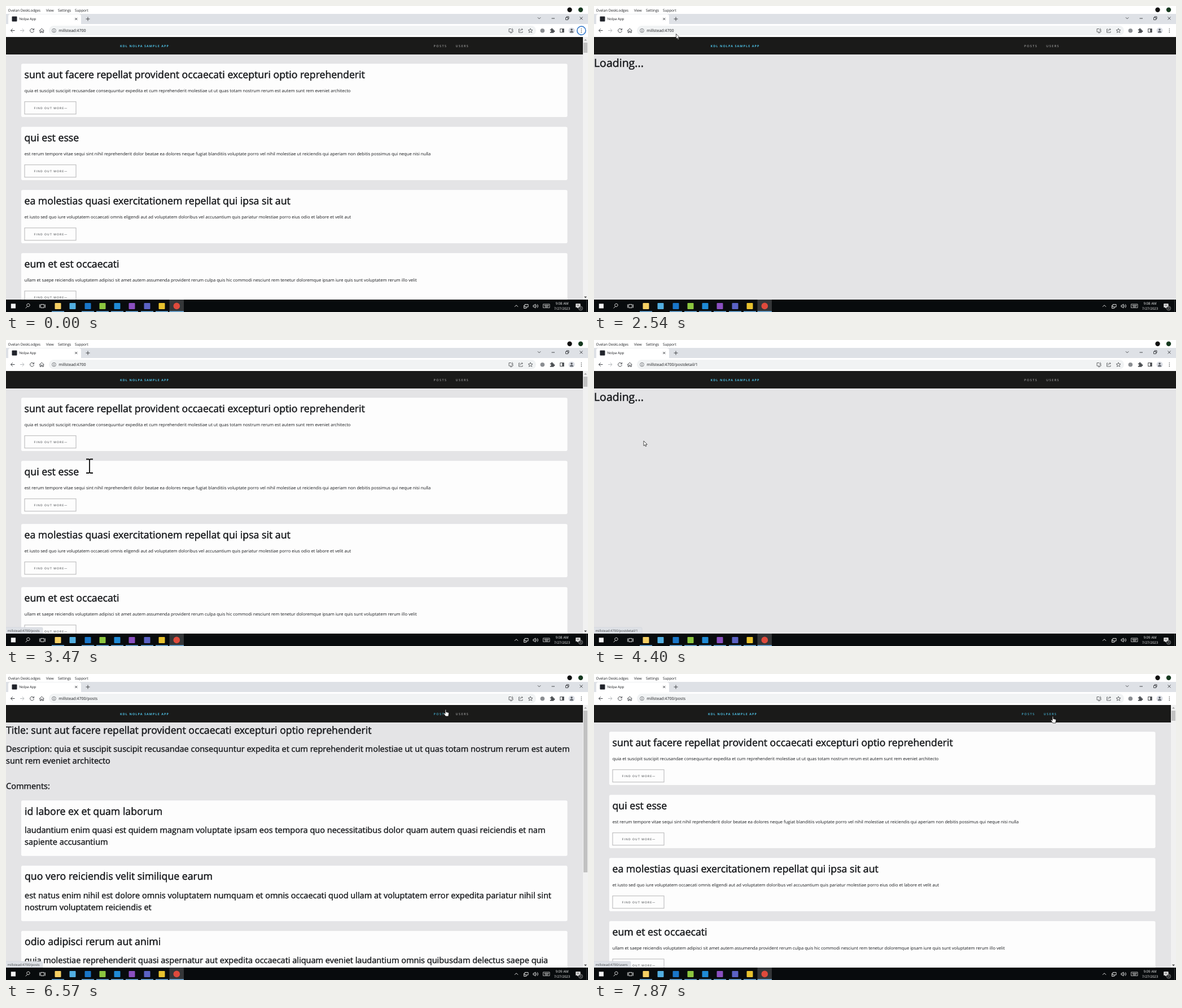
An HTML page that plays this animation: 1031x543 px, repeating every 8000 ms.

```html
<!DOCTYPE html>
<html lang="en">
<head>
<meta charset="utf-8">
<title>Sample app</title>
<style>
  html, body { margin: 0; width: 100%; height: 100%; overflow: hidden; background: #e4e4e6; }
  svg { display: block; }
  text { font-family: "Open Sans", "Noto Sans", sans-serif; text-rendering: geometricPrecision; white-space: pre; fill: #17191c; }
  .head { stroke: #17191c; stroke-width: .5px; }
  .mid { stroke: #17191c; stroke-width: .42px; }
  .nav { letter-spacing: 1.4px; font-weight: 600; fill: #999; }
  .brand { letter-spacing: 1.1px; font-weight: 700; fill: #4fc3e8; }
  .btn { letter-spacing: 1.1px; font-weight: 600; fill: #5c5f62; }
  .line { fill: none; stroke: #44474b; stroke-width: 1; }
  .tray { fill: none; stroke: #f2f2f2; stroke-width: .9; }
  .light { fill: #f4f4f4; }
</style>
</head>
<body>
<svg id="stage" width="1031" height="543" viewBox="0 0 1031 543"></svg>
<script>
const LOOP = 8000;
const HOST = 'millstead:4700';
const HEAD = 17.7, MID = 14.53, BODY = 7.61;

// Drawing helpers
const text = (x, y, size, str, more = '') => `<text x="${x}" y="${y}" font-size="${size}" ${more}>${str}</text>`;
const rect = (x, y, w, h, fill, more = '') => `<rect x="${x}" y="${y}" width="${w}" height="${h}" fill="${fill}" ${more}/>`;
const disc = (x, y, r, fill, more = '') => `<circle cx="${x}" cy="${y}" r="${r}" fill="${fill}" ${more}/>`;
const line = (d, more = '', cls = 'line') => `<path class="${cls}" d="${d}" ${more}/>`;
const card = (y, h) => rect(26.5, y, 968.5, h, '#fdfdfd', 'rx="3" stroke="#dcdcdf" stroke-width=".6"');
const head = (x, y, str) => text(x, y, HEAD, str, 'class="head"');
const mid = (x, y, str) => text(x, y, MID, str, 'class="mid"');

const posts = [
  ['sunt aut facere repellat provident occaecati excepturi optio reprehenderit',
   'quia et suscipit suscipit recusandae consequuntur expedita et cum reprehenderit molestiae ut ut quas totam nostrum rerum est autem sunt rem eveniet architecto'],
  ['qui est esse',
   'est rerum tempore vitae sequi sint nihil reprehenderit dolor beatae ea dolores neque fugiat blanditiis voluptate porro vel nihil molestiae ut reiciendis qui aperiam non debitis possimus qui neque nisi nulla'],
  ['ea molestias quasi exercitationem repellat qui ipsa sit aut',
   'et iusto sed quo iure voluptatem occaecati omnis eligendi aut ad voluptatem doloribus vel accusantium quis pariatur molestiae porro eius odio et labore et velit aut'],
  ['eum et est occaecati',
   'ullam et saepe reiciendis voluptatem adipisci sit amet autem assumenda provident rerum culpa quis hic commodi nesciunt rem tenetur doloremque ipsam iure quis sunt voluptatem rerum illo velit'],
];

const comments = [
  ['id labore ex et quam laborum',
   'laudantium enim quasi est quidem magnam voluptate ipsam eos tempora quo necessitatibus dolor quam autem quasi reiciendis et nam',
   'sapiente accusantium'],
  ['quo vero reiciendis velit similique earum',
   'est natus enim nihil est dolore omnis voluptatem numquam et omnis occaecati quod ullam at voluptatem error expedita pariatur nihil sint',
   'nostrum voluptatem reiciendis et'],
  ['odio adipisci rerum aut animi',
   'quia molestiae reprehenderit quasi aspernatur aut expedita occaecati aliquam eveniet laudantium omnis quibusdam delectus saepe quia', ''],
];

const scrollbar = thumb => rect(1022, 55, 9, 466, '#f1f1f1') + rect(1023, 65, 7, thumb, '#c1c1c1') +
  '<path d="M1024 61.5l2.5-3 2.5 3z" fill="#a3a3a3"/><path d="M1024 515.5l2.5 3 2.5-3z" fill="#505050"/>';

const postList = posts.map(([title, body], i) => {
  const y = 102 + i * 112;
  return card(y, 95.5) + head(32.5, y + 25.5, title) + text(32.8, y + 50.7, BODY, body) +
    rect(33, y + 67.8, 91, 22, 'none', 'stroke="#b4b4b6"') + text(49.5, y + 81, 5, 'FIND OUT MORE—', 'class="btn"');
}).join('') + scrollbar(18);

const loading = text(0, 107.5, 19.5, 'Loading...', 'class="head"');

const split = posts[0][1].indexOf(' sunt rem');
const detail = head(0, 106, 'Title: ' + posts[0][0]) +
  mid(0, 138, 'Description: ' + posts[0][1].slice(0, split)) +
  mid(0, 159, posts[0][1].slice(split + 1)) +
  mid(0, 203.5, 'Comments:') +
  comments.map(([title, first, second], i) => {
    const y = 224 + i * 115.7;
    return card(y, 99.3) + head(33, y + 25.5, title) + mid(33, y + 57.8, first) + mid(33, y + 79.2, second);
  }).join('') + scrollbar(287);

const navbar = '<g id="links">' + text(202, 73.2, 5.4, 'KDL NOLPA SAMPLE APP', 'class="brand"') +
  text(757.5, 73.2, 5.5, 'POSTS', 'class="nav" id="postsLink"') +
  text(796.5, 73.2, 5.5, 'USERS', 'class="nav" id="usersLink"') + '</g>';

const browser = rect(0, 0, 1031, 14, '#fff') +
  text(3.5, 9.8, 6.3, 'Ovelan DeskLodges') + text(71, 9.8, 6.3, 'View') + text(92, 9.8, 6.3, 'Settings') + text(122, 9.8, 6.3, 'Support') +
  disc(998.5, 6.8, 4.2, '#111') + disc(1018, 6.8, 4.2, '#173a20') +
  rect(0, 14, 1031, 20, '#dee1e6') + rect(4, 14.5, 129, 24, '#fff', 'rx="4"') + rect(0, 32, 1031, 23, '#fff') +
  rect(10.5, 18.5, 9, 9, '#20232a', 'rx="1"') + text(23.5, 25.3, 6.1, 'Nolpa App') +
  line('M122.3 21l4 4m0-4l-4 4M141.5 23h7m-3.5-3.5v7') +
  line('M942 20.3l2.5 2.5 2.5-2.5M966.5 22h5.5M991.5 20.5h4v4h-4zM993 20.3v-1.5h4v4h-1.3M1016.5 19.3l5 5m0-5l-5 5') +
  rect(76, 35, 863, 17, '#f1f3f4', 'rx="8.5"') +
  line('M15.5 43.5h-7m3.2-3.2l-3.3 3.2 3.3 3.2') +
  line('M25 43.5h7m-3.2-3.2l3.3 3.2-3.3 3.2', 'style="stroke:#b5b8bb"') +
  line('M48.7 41.5a3.4 3.4 0 1 0 .7 2.6M49.5 39.8v2.5h-2.6') +
  line('M59.2 43.8l4.1-3.8 4.1 3.8M60.3 43v4.2h2v-2.5h2v2.5h2v-4.2') +
  disc(85, 43.6, 3.4, 'none', 'stroke="#5f6368" stroke-width=".8"') + line('M85 43.2v2.2m0-3.8v.8') +
  line('M895 40.5h-4v5.5h7v-2M893 47.6h3.5M897 39.5v4m-1.7-1.5l1.7 1.7 1.7-1.7', 'style="stroke-width:.8"') +
  line('M910.5 41h-2v6h6.5v-2M910.5 45c0-2.5 1.5-3.5 4.5-3.5m-1.6-1.8l1.8 1.8-1.8 1.8', 'style="stroke-width:.8"') +
  line('M929 39.8l1.1 2.6 2.8.2-2.1 1.8.7 2.8-2.5-1.5-2.5 1.5.7-2.8-2.1-1.8 2.8-.2z', 'style="stroke-width:.8"') +
  disc(950.3, 43.7, 3.8, '#8b8e92') +
  '<path d="M963.8 41.5h2a1.4 1.4 0 1 1 2.6 0h2v2a1.4 1.4 0 1 1 0 2.6v1.6h-6.6v-2a1.3 1.3 0 1 0 0-2.4z" fill="#4c4f53"/>' +
  rect(981.7, 40.6, 6.4, 6, 'none', 'stroke="#44474b"') + rect(985.3, 40.6, 2.8, 6, '#44474b') +
  disc(1002, 43.7, 5.5, '#d9dce3') + disc(1002, 42, 1.7, '#50545b') + '<path d="M998.8 47c.5-3.2 5.9-3.2 6.4 0z" fill="#50545b"/>' +
  disc(1019.3, 43.7, 7.6, 'none', 'id="ring" stroke="#2c74c9" stroke-width="1.5"') +
  [40.8, 43.7, 46.6].map(y => disc(1019.3, y, .8, '#44474b')).join('') +
  text(93.3, 46.2, 7.1, '', 'id="url"');

const status = '<g id="status">' + rect(-4, 510, 69, 16, '#dee1e6', 'id="statusBox" rx="2" stroke="#cfd2d8" stroke-width=".6"') +
  text(2.5, 518.3, 5.9, '', 'id="statusText" style="fill:#45484c"') + '</g>';

// Plain marks for the running programs: centre, colour
const apps = [[92, '#f5cf63'], [118, '#52aee0'], [145, '#1976c9'], [171, '#8cc63f'], [197, '#1f8ad6'],
  [223, '#8a4fc0'], [250, '#5b62c4'], [276, '#e8c22e']];
const taskbar = rect(0, 521, 1031, 22, '#080b0d') + rect(289.5, 521, 25.5, 22, '#343638') +
  rect(8.8, 528.3, 8.2, 8.2, '#f4f4f4') +
  line('M40.8 533.3a2.7 2.7 0 1 1 .1-.1M37.2 533.8l-3 3', 'transform="translate(.5 -.5)"', 'tray') +
  line('M61.5 529.5h6v6h-6zM59.5 529.5v6M69.5 529.5v6', '', 'tray') +
  apps.map(([x, c]) => rect(x - 5.5, 527, 11, 11, c, 'rx="1"') + (x === 118 ? '' : rect(x - 11, 541.5, 22, 1.5, '#76b9ed'))).join('') +
  disc(302.3, 532.4, 5.8, '#df4a3c') + rect(289.5, 541.5, 25.5, 1.5, '#76b9ed') +
  line('M901 533.8l3-3 3 3', '', 'tray') +
  line('M919 529.5h6v4.5h-6zM917.5 531v5.5h4M922 534v2.5', '', 'tray') +
  line('M934 531h1.6l2.2-2v7l-2.2-2h-1.6zM939.3 530.8c1 1 1 2.4 0 3.4M941 529.3c1.9 2 1.9 4.3 0 6.3', '', 'tray') +
  line('M951.5 529h11.5v6.5h-11.5zM953.5 531h8M953.5 532.3h8M955 534h5', 'style="stroke-width:.7"', 'tray') +
  text(985, 529.8, 6.1, '', 'id="clock" class="light" text-anchor="middle"') +
  text(985, 539.3, 6, '7/27/2023', 'class="light" text-anchor="middle"') +
  '<path class="light" d="M1009.3 528.3h8.2v6.5h-3.5l-2 2v-2h-2.7z"/>' +
  line('M1010.8 530.5h5m-5 1.8h5', 'style="stroke:#111;stroke-width:.6"') +
  disc(1018, 536.5, 3.6, '#26282a', 'stroke="#ddd" stroke-width=".5"') +
  text(1018, 538.4, 5, '1', 'class="light" text-anchor="middle"') + rect(1028, 521, .6, 22, '#55585a');

const cursors =
  '<path id="arrow" d="M0 0v8.7l2-1.8 1.3 3 1.5-.7-1.3-2.9h2.8z" fill="#fff" stroke="#222" stroke-width=".8"/>' +
  '<path id="beam" d="M-6 -12h4.5l1.5 1 1.5-1h4.5M-6 12.5h4.5l1.5-1 1.5 1h4.5M0 -11v22.5" fill="none" stroke="#0a0a0a" stroke-width="1.8"/>' +
  '<path id="hand" d="M0 1c0-1.3 1.7-1.3 1.7 0v3.5l3.5.8c1 .3 1.3.9 1.2 2l-.6 4.7h-5l-3.2-4.3c-.6-1 .7-1.8 1.5-1l.9.9z" fill="#fff" stroke="#111" stroke-width=".8"/>';

document.getElementById('stage').innerHTML =
  rect(0, 0, 1031, 543, '#e4e4e6') + rect(0, 55, 1031, 31, '#1a1a19') +
  `<g id="posts">${postList}</g><g id="loading">${loading}</g><g id="detail">${detail}</g>` +
  navbar + browser + status + taskbar + `<g id="cursor">${cursors}</g>`;

const el = Object.fromEntries([...document.querySelectorAll('[id]')].map(n => [n.id, n]));

// Timelines: [start, value]
const scenes = [[0, 'posts'], [2500, 'loading'], [3100, 'posts'], [4270, 'loading'], [4870, 'detail'], [6710, 'loading'], [7040, 'posts']];
const paths = [[0, ''], [4270, '/postdetail/1'], [6500, '/posts']];
const waiting = 'Waiting for proxy tunnel...';
const hints = [[0, ''], [2600, waiting], [3100, HOST + '/posts'], [3740, ''], [4010, HOST + '/postdetail/1'],
  [4900, ''], [6500, HOST + '/posts'], [7840, HOST + '/users']];
const kinds = [[0, ''], [30, 'arrow'], [240, 'beam'], [2120, 'arrow'], [3060, 'hand'], [3370, 'arrow'], [3440, 'beam'],
  [3800, 'arrow'], [4010, 'hand'], [4270, 'arrow'], [6500, 'hand']];
// Pointer stops: [time, x, y]
const moves = [[30, 520, 330], [300, 96, 128], [2040, 96, 128], [2280, 46, 44], [2450, 46, 44], [2840, 767, 84], [2990, 767, 84],
  [3090, 772, 70], [3340, 772, 70], [3470, 148, 223.5], [3700, 148, 223.5], [4040, 88, 179], [6310, 88, 179],
  [6550, 778, 63], [7770, 778, 63], [7870, 812, 75]];

const at = (list, t) => list.filter(([start]) => start <= t).pop()[1];

function position(t) {
  const next = moves.findIndex(([time]) => time > t);
  if (next < 1) return (next ? moves[moves.length - 1] : moves[0]).slice(1);
  const [t0, x0, y0] = moves[next - 1], [t1, x1, y1] = moves[next];
  const p = (t - t0) / (t1 - t0), k = p * p * (3 - 2 * p);
  return [x0 + (x1 - x0) * k, y0 + (y1 - y0) * k];
}

const show = (node, on) => { node.style.display = on ? '' : 'none'; };
const paint = (node, lit) => { node.style.fill = lit ? '#45afd0' : '#999'; };

function draw(now) {
  const t = now % LOOP;
  const scene = at(scenes, t), hint = at(hints, t), kind = at(kinds, t);
  ['posts', 'loading', 'detail'].forEach(id => show(el[id], id === scene));
  el.links.setAttribute('transform', `translate(${scene === 'loading' ? 4.5 : 0})`);
  el.url.textContent = HOST + at(paths, t);
  el.clock.textContent = t < 4040 ? '9:08 AM' : '9:09 AM';
  show(el.ring, t < 2400);
  paint(el.postsLink, t >= 6500 || (t >= 3060 && t < 3370));
  paint(el.usersLink, t >= 7840);

  show(el.status, hint);
  el.statusText.textContent = hint;
  el.statusBox.setAttribute('width', hint === waiting ? 347 : hint.endsWith('/1') ? 89 : 69);

  ['arrow', 'beam', 'hand'].forEach(id => show(el[id], id === kind));
  el.cursor.setAttribute('transform', `translate(${position(t)})`);
  requestAnimationFrame(draw);
}
draw(performance.now());
</script>
</body>
</html>
```
